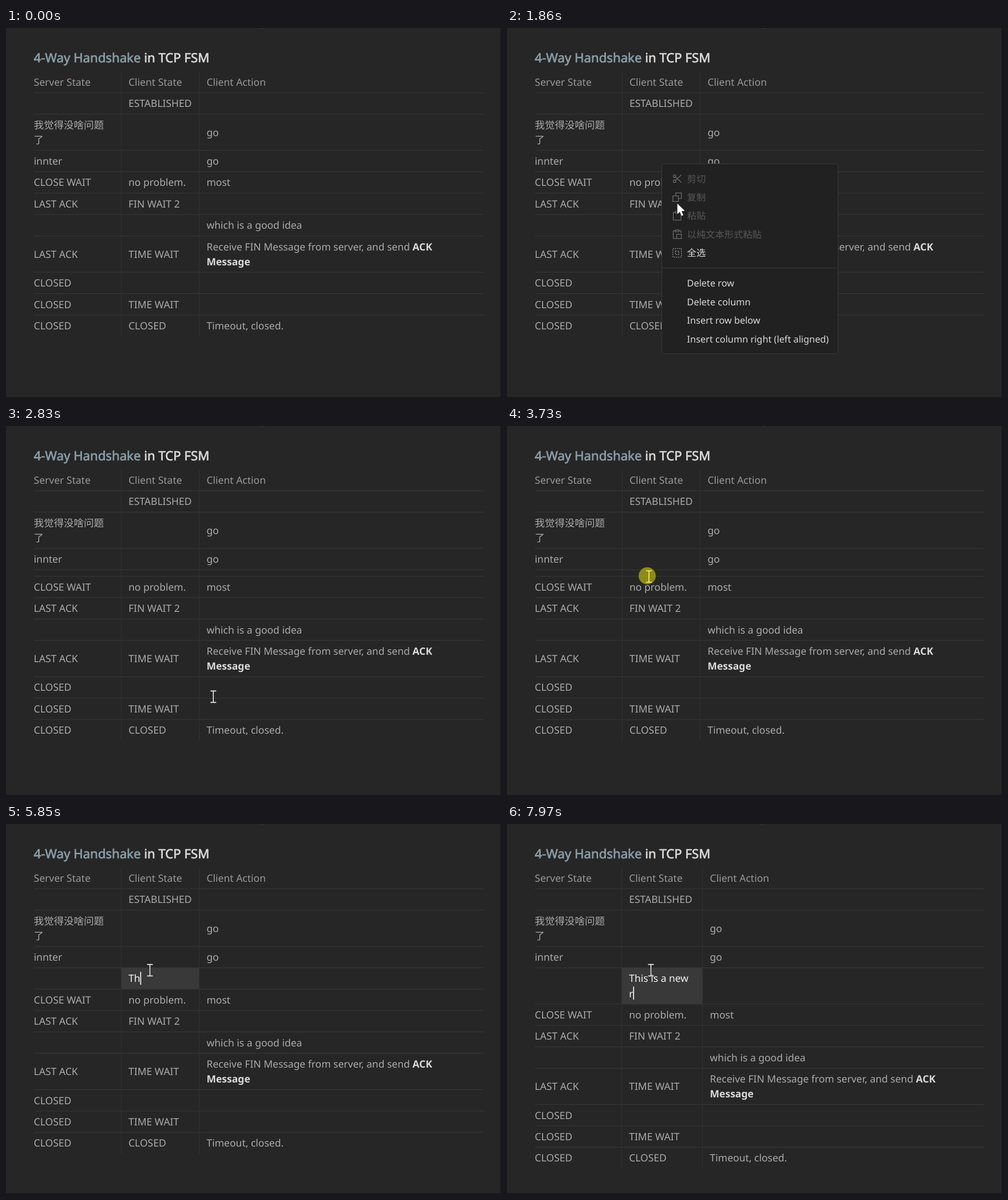
Write an HTML page with a canvas that moves like this. It is 865 px wide and 647 px high and loops after 8000 ms.

```html
<!DOCTYPE html>
<html lang="zh-CN">
<head>
<meta charset="utf-8">
<title>TCP table</title>
<style>
html, body { margin: 0; width: 100%; height: 100%; overflow: hidden; background: #262626; }
canvas { display: block; }
</style>
</head>
<body>
<canvas id="stage" width="865" height="647"></canvas>
<script>
const ctx = document.getElementById('stage').getContext('2d');
ctx.textRendering = 'geometricPrecision';
const FAMILY = '"Noto Sans", "Noto Sans CJK SC", "Noto Sans CJK", sans-serif';
const LOOP = 8000, LEFT = 49, RIGHT = 834, LINE = 26.05, PADDING = 11.35;

const INSERT_AT = 2690, EDIT_AT = 4860, WRAP_AT = 7970;
const MENU = [1320, INSERT_AT];
const EDIT_OLD = [3800, 4600];
const CLICKS = [[990, 1250], [2420, 2690], [3530, 3800], [4530, 4790]];
const TYPED = 'This is a new r';
const KEY_TIMES = [5650, 5850, 5980, 6110, 6240, 6370, 6510, 6640, 6770,
  6910, 7110, 7260, 7460, 7590, WRAP_AT];

// Pointer legs: start, end, number of steps, from, to
const LEGS = [
  [120, 920, 12, [661, 545], [268, 235]],
  [1521, 2350, 12, [268, 235], [380.5, 511]],
  [2684, 3210, 8, [380.5, 511], [245, 262]],
  [4133, 4400, 4, [245, 262], [248.5, 254.3]]
];

const ROWS = [
  ['', 'ESTABLISHED', ''],
  [['我觉得没啥问题', '了'], '', 'go'],
  ['innter', '', 'go'],
  ['CLOSE WAIT', 'no problem.', 'most'],
  ['LAST ACK', 'FIN WAIT 2', ''],
  ['', '', 'which is a good idea'],
  ['LAST ACK', 'TIME WAIT', ['Receive FIN Message from server, and send **ACK**', '**Message**']],
  ['CLOSED', '', ''],
  ['CLOSED', 'TIME WAIT', ''],
  ['CLOSED', 'CLOSED', 'Timeout, closed.']
];

const MENU_ITEMS = [
  { label: '剪切', y: 263.5, off: true, icon: 'M3 6a3 3 0 1 0 6 0a3 3 0 1 0-6 0M3 18a3 3 0 1 0 6 0a3 3 0 1 0-6 0M8.1 8.1L22 21M22 3L8.1 15.9' },
  { label: '复制', y: 295.9, off: true, icon: 'M2 9h13v13H2zM9 9V2h13v13h-7' },
  { label: '粘贴', y: 328.3, off: true, icon: 'M8 4H3v18h18V4h-5M8 2h8v4H8z' },
  { label: '以纯文本形式粘贴', y: 360.7, off: true, icon: 'M8 4H3v18h7M21 9V4h-5M8 2h8v4H8zM11 12h11v10H11z' },
  { label: '全选', y: 393.1, dash: true, icon: 'M2 2h20v20H2zM8 8h8v8H8z' },
  { label: 'Delete row', y: 446.3 },
  { label: 'Delete column', y: 478.7 },
  { label: 'Insert row below', y: 511.1 },
  { label: 'Insert column right (left aligned)', y: 543.5 }
];

const ARROW = new Path2D('M.5.5V18.6L4.7 14.8 7.7 22 10.9 20.6 7.9 13.6 13.6 13.2Z');
const IBEAM = new Path2D('M-5-10H5M0-10V10M-5 10H5');

const within = (t, [start, end]) => t >= start && t < end;

function setFont(size, weight = 400) {
  ctx.font = `${weight} ${size}px ${FAMILY}`;
}

function fillRect(color, x, y, w, h) {
  ctx.fillStyle = color;
  ctx.fillRect(x, y, w, h);
}

function panel(x, y, w, h, radius, fill, stroke) {
  ctx.beginPath();
  ctx.roundRect(x, y, w, h, radius);
  ctx.fillStyle = fill;
  ctx.fill();
  if (stroke) {
    ctx.strokeStyle = stroke;
    ctx.lineWidth = 1;
    ctx.stroke();
  }
}

// Parts between double asterisks are bold; returns the x after the text.
function drawText(text, x, y, color) {
  text.split('**').forEach((part, i) => {
    setFont(17.5, i % 2 ? 700 : 400);
    ctx.fillStyle = i % 2 ? '#dadada' : color;
    ctx.fillText(part, x, y);
    x += ctx.measureText(part).width;
  });
  return x;
}

function drawCaret(x, baseline) {
  fillRect('#fff', x, baseline - 18, 1.6, 22.5);
}

// A thin outline gives the title its medium weight.
function drawTitle() {
  let x = 48.5;
  setFont(22.2);
  ctx.lineWidth = .7;
  for (const [text, color] of [['4-Way Handshake ', '#8a9ea8'], ['in TCP FSM', '#dadada']]) {
    ctx.fillStyle = ctx.strokeStyle = color;
    ctx.fillText(text, x, 59.6);
    ctx.strokeText(text, x, 59.6);
    x += ctx.measureText(text).width;
  }
}

function newRow(t) {
  const typed = TYPED.slice(0, KEY_TIMES.filter(k => t >= k).length);
  const wrapped = t >= WRAP_AT;
  return {
    cells: ['', wrapped ? ['This is a new', 'r'] : typed, ''],
    lines: t < EDIT_AT ? 0 : wrapped ? 2 : 1,
    editing: t >= EDIT_AT,
    caret: t < 5390 || t >= KEY_TIMES[0]
  };
}

function tableRows(t) {
  const rows = ROWS.map(cells => ({
    cells,
    lines: Math.max(...cells.map(c => Array.isArray(c) ? c.length : 1))
  }));
  if (within(t, EDIT_OLD)) {
    Object.assign(rows[3], { editing: true, caret: t < 4330, caretAfter: 'no ' });
  }
  if (t >= INSERT_AT) rows.splice(3, 0, newRow(t));
  return rows;
}

function drawTable(t) {
  const wide = t >= WRAP_AT;
  const columnX = [48.6, wide ? 213.2 : 214, wide ? 354.6 : 350.5];
  const dividers = wide ? [200.5, 341.7] : [201.3, 337.5];
  const rows = tableRows(t);

  ['Server State', 'Client State', 'Client Action'].forEach((label, i) =>
    drawText(label, columnX[i], 100.8, '#999'));

  let y = 113.2;
  for (const row of rows) {
    const height = PADDING + row.lines * LINE;
    fillRect('#373737', LEFT, y - .6, RIGHT - LEFT, 1.1);
    if (row.editing) {
      fillRect('#393939', dividers[0] + .4, y + .3, dividers[1] - dividers[0] - .4, height - .6);
    }
    row.cells.forEach((cell, column) => {
      const lines = [].concat(cell);
      const active = row.editing && column === 1;
      lines.forEach((line, i) => {
        const baseline = y + height / 2 + 6.3 + (i - (lines.length - 1) / 2) * LINE;
        const end = drawText(line, columnX[column], baseline, active ? '#f4f4f4' : '#ababab');
        if (active && row.caret && i === lines.length - 1) {
          const caretX = row.caretAfter
            ? columnX[1] + ctx.measureText(row.caretAfter).width : end;
          drawCaret(caretX, baseline);
        }
      });
    });
    y += height;
  }
  dividers.forEach(x => fillRect('#343434', x - .5, 77, 1, y - 77));
}

function drawIcon({ icon, dash, off, y }) {
  ctx.save();
  ctx.translate(288.3, y - 9);
  ctx.scale(.75, .75);
  ctx.lineWidth = 1.7;
  ctx.strokeStyle = off ? '#6a6a6a' : '#a0a0a0';
  if (dash) ctx.setLineDash([2.5, 2.5]);
  ctx.stroke(new Path2D(icon));
  ctx.restore();
}

function drawMenu(pointer) {
  panel(270.5, 237.5, 308, 332, 4, '#212121', '#373737');
  fillRect('#363636', 271, 419, 307, 1);
  for (const item of MENU_ITEMS) {
    const hovered = pointer.x > 280 && Math.abs(pointer.y - item.y) < 16.2;
    if (hovered && !item.off) panel(280, item.y - 16.2, 289.5, 32.4, 4, '#2e2e2e');
    if (item.icon) drawIcon(item);
    setFont(16.3, item.dash ? 500 : 400);
    ctx.fillStyle = item.off ? '#595959' : '#dadada';
    ctx.fillText(item.label, 314.6, item.y + 6);
  }
}

function pointerAt(t) {
  const leg = LEGS.filter(l => t >= l[0]).pop();
  if (!leg) return null;
  const [start, end, steps, from, to] = leg;
  const p = Math.min(1, Math.floor((t - start) / (end - start) * steps + .03) / steps);
  const eased = p * p * (3 - 2 * p);
  return {
    x: from[0] + (to[0] - from[0]) * eased,
    y: from[1] + (to[1] - from[1]) * eased
  };
}

function drawPointer(t, { x, y }) {
  ctx.save();
  if (t < 2620) {
    ctx.translate(x, y);
    ctx.strokeStyle = '#1a1a1a';
    ctx.lineWidth = 1;
    ctx.stroke(ARROW);
    ctx.fillStyle = '#fff';
    ctx.fill(ARROW);
  } else {
    ctx.translate(x + 3, y + 1.3);
    for (const [color, width] of [['#1c1c1c', 2.6], ['#f0f0f0', 1.6]]) {
      ctx.strokeStyle = color;
      ctx.lineWidth = width;
      ctx.stroke(IBEAM);
    }
  }
  ctx.restore();
  if (CLICKS.some(click => within(t, click))) {
    ctx.beginPath();
    ctx.arc(x, y, 15, 0, 2 * Math.PI);
    ctx.fillStyle = 'rgba(255, 255, 0, .47)';
    ctx.fill();
  }
}

function render(now) {
  const t = now % LOOP;
  const pointer = pointerAt(t);
  fillRect('#262626', 0, 0, 865, 647);
  fillRect('#555', t < WRAP_AT ? 447.5 : 444, 0, 1.5, 1);
  drawTitle();
  drawTable(t);
  if (within(t, MENU)) drawMenu(pointer);
  if (pointer) drawPointer(t, pointer);
  fillRect('#1b1618', 0, 645.5, 865, 1.5);
  fillRect('#1b1618', 864, 0, 1, 647);
}

const startTime = performance.now();
function tick() {
  render(performance.now() - startTime);
  requestAnimationFrame(tick);
}
tick();
</script>
</body>
</html>
```
